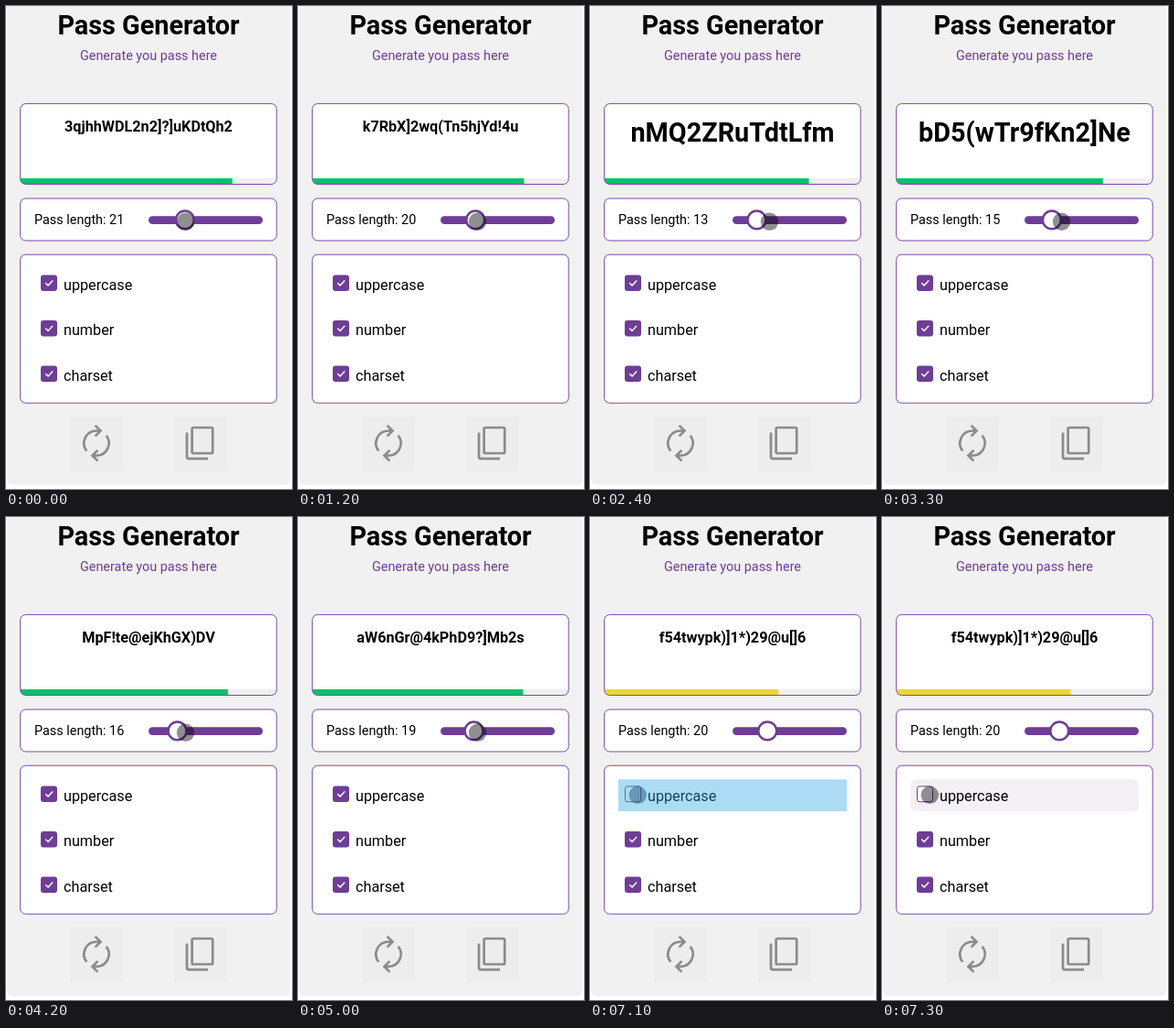
Write an HTML page that moves like this. It is 313 px wide and 527 px high and loops after 8000 ms.

```html
<!DOCTYPE html>
<html lang="en">
<head>
<meta charset="utf-8">
<title>Pass Generator</title>
<style>
  html, body { margin: 0; width: 100%; height: 100%; overflow: hidden; background: #fff; }
  svg { display: block; width: 100%; height: 100%; }
  text { font-family: Roboto, sans-serif; font-size: 16.2px; white-space: pre; }
  .mid { text-anchor: middle; }
  .bold { font-weight: 700; }
  .small { font-size: 14.4px; }
  .big { font-size: 28.8px; }
  .purple { fill: #6e3d97; }
  .card { fill: #fff; }
  .edge { fill: none; stroke: #7c4aa3; stroke-width: 1; }
  .icon { fill: none; stroke: #8b8b8b; stroke-width: 2.7; }
  .tick { fill: none; stroke: #fff; stroke-width: 1.5; stroke-linecap: round; stroke-linejoin: round; }
</style>
</head>
<body>
<svg viewBox="0 0 313 527">
  <defs>
    <clipPath id="inside"><rect x="15.6" y="106.6" width="280.6" height="87.9" rx="6"/></clipPath>
    <g id="checked">
      <rect class="purple" x="38" y="-8.8" width="18" height="17.6" rx="3"/>
      <path class="tick" d="M43.6 .2l2.5 2.4 4.6-5"/>
    </g>
  </defs>

  <rect x="1" y="-10" width="310.5" height="532.5" rx="6" fill="#f1f1f1"/>
  <text class="mid bold big" x="156" y="31">Pass Generator</text>
  <text class="mid small purple" x="156" y="59">Generate you pass here</text>

  <rect class="card" x="15.6" y="106.6" width="280.6" height="87.9" rx="6"/>
  <g clip-path="url(#inside)">
    <rect x="16" y="188" width="280" height="7" fill="#efefef"/>
    <rect id="bar" x="16" y="188" height="7"/>
  </g>
  <rect class="edge" x="15.6" y="106.6" width="280.6" height="87.9" rx="6"/>
  <text id="pass" class="mid bold" x="156"></text>

  <rect class="card edge" style="fill:#fff" x="15.6" y="210" width="280.6" height="46" rx="6"/>
  <text id="count" class="small" x="31" y="238"></text>
  <rect class="purple" x="156" y="229.3" width="125" height="8.6" rx="4.3"/>
  <circle id="thumb" cy="233.4" r="9.9" fill="#fff" stroke="#6e3d97" stroke-width="2.4"/>

  <rect class="card edge" style="fill:#fff" x="15.6" y="271.2" width="280.6" height="162" rx="6"/>
  <rect id="hover" x="31" y="286.3" width="250" height="34.8" rx="6" fill="#f4f0f6"/>
  <rect id="empty" x="38.5" y="293.9" width="17" height="16.8" rx="2.5" fill="#fff" stroke="#6e3d97"/>
  <use id="upper" href="#checked" y="302.3"/>
  <use href="#checked" y="351.8"/>
  <use href="#checked" y="401.3"/>
  <text x="63" y="310">uppercase</text>
  <text x="63" y="359.3">number</text>
  <text x="63" y="409">charset</text>

  <g fill="#ededed">
    <rect x="70" y="448" width="58" height="59.5"/>
    <rect x="184" y="448" width="58" height="59.5"/>
  </g>
  <g class="icon">
    <path d="M103 463.5H99A13.5 13.5 0 0 0 88.3 485.4M97.6 457.6l5.9 5.9-5.9 5.9"/>
    <path d="M95 490.5H99A13.5 13.5 0 0 0 109.7 468.6M100.4 496.4l-5.9-5.9 5.9-5.9"/>
    <rect x="203.6" y="460" width="22.6" height="28" rx="1.5"/>
    <path d="M198 465.5V492a1.8 1.8 0 0 0 1.8 1.8H221"/>
  </g>

  <circle id="pointer" r="9.7" fill="#000" fill-opacity=".44"/>
  <rect id="flash" x="31" y="286.3" width="250" height="34.8" fill="#2ea5e6"/>
</svg>
<script>
const LOOP = 8000, STEP = 100;

// [start ms, password]
const passes = [
  [0, "3qjhhWDL2n2]?]uKDtQh2"],
  [1200, "k7RbX]2wq(Tn5hjYd!4u"],
  [1400, "fm4Kd?9vHnR2x)pGj7b"],
  [1600, "hT3]yLq8Vb!dN6wzP2"],
  [1700, "uE9rX(k5tMc2?gJ4a"],
  [1900, "3D]MsY4?WfCX))Fg"],
  [2000, "t4arKfB2Hy7ds5L"],
  [2200, "pX3hRt8uGkd2fN"],
  [2400, "nMQ2ZRuTdtLfm"],
  [3200, "MhQ4Rn8HdG2kuV"],
  [3300, "bD5(wTr9fKn2]Ne"],
  [4200, "MpF!te@ejKhGX)DV"],
  [4300, "g4Yk!s7BvJ]2hRq)t"],
  [4800, "Zc8uN?mL3xHd]5pTf2"],
  [5000, "aW6nGr@4kPhD9?]Mb2s"],
  [5100, "Vj64jwkM]43f&!A6j)xH"],
  [7100, "f54twypk)]1*)29@u[]6"]
];

// [start ms, x, y]; no position means hidden
const pointerPath = [
  [0, 196.5, 235.3], [5800, 178, 241], [5900],
  [6200, 31.5, 341.5], [6300, 37, 330], [6400, 46, 315],
  [6500, 57, 305], [6600, 61, 303.3], [6700, 52.3, 303.3]
];

const el = id => document.getElementById(id);
const at = (list, t) => list.filter(row => row[0] <= t).pop();
const set = (id, attrs) => {
  for (const name in attrs) el(id).setAttribute(name, attrs[name]);
};
const show = (id, on) => set(id, { visibility: on ? "visible" : "hidden" });

function draw(t) {
  const pass = at(passes, t)[1], n = pass.length;
  const big = n < 16, off = t >= 7100;

  el("pass").textContent = pass;
  set("pass", { class: "mid bold" + (big ? " big" : ""), y: big ? 148 : 137 });
  el("count").textContent = "Pass length: " + n;
  set("thumb", { cx: 182.5 + (n - 13) * 1.67 });

  const end = off ? 206.5 : Math.min(247.7, 239.5 + (n - 13) * 1.12);
  set("bar", { width: end - 16, fill: off ? "#ecd733" : "#08c16a" });

  show("upper", !off);
  show("empty", off);
  show("hover", t >= 7200);
  set("flash", { opacity: !off || t >= 7300 ? 0 : t < 7200 ? 0.4 : 0.2 });

  const [, x, y] = at(pointerPath, t);
  show("pointer", x !== undefined);
  if (x !== undefined) set("pointer", { cx: x, cy: y });
}

let last = -1;
function tick() {
  const t = Math.floor(performance.now() % LOOP / STEP) * STEP;
  if (t !== last) draw(last = t);
  requestAnimationFrame(tick);
}
tick();
</script>
</body>
</html>
```
